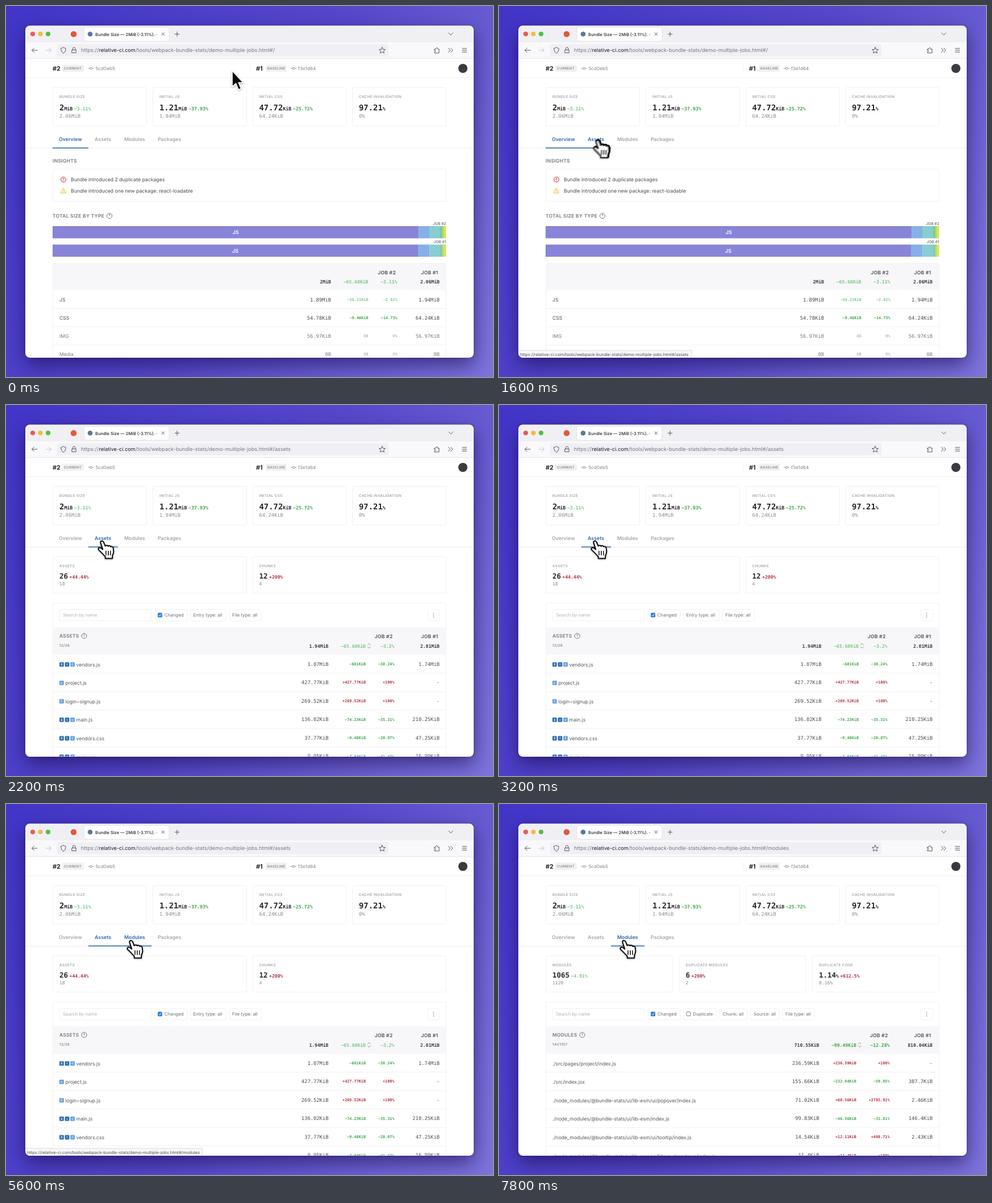
Animation, 857 px wide and 654 px high, one loop 8 s. Source, as an HTML page:

```html
<!DOCTYPE html>
<html lang="en">
<head>
<meta charset="utf-8">
<title>Bundle stats</title>
<style>
  html, body { margin: 0; width: 100%; height: 100%; overflow: hidden; }
  body { position: relative; background: linear-gradient(118deg, #4235c8 0%, #5648cb 50%, #7d74dc 100%); }
  #frame { position: absolute; left: 34px; top: 34.5px; width: 789px; height: 585px; border-radius: 8px;
    background: #fff; box-shadow: 0 13px 34px rgba(22, 8, 70, .6), 0 0 4px rgba(22, 8, 70, .3); }
  svg { position: absolute; left: 0; top: 0; }
  text { font-family: Inter, sans-serif; text-rendering: geometricPrecision; white-space: pre; }
  .mono { font-family: "DejaVu Sans Mono", monospace; }
  .icon { fill: none; stroke: #55555c; stroke-width: 1; stroke-linecap: round; stroke-linejoin: round; }
  .tab text { fill: #a6a6aa; }
  .tab rect { visibility: hidden; }
  .tab.on text, .tab.on rect { fill: #2a68b0; visibility: visible; }
</style>
</head>
<body>
<div id="frame"></div>
<svg id="stage" width="857" height="654" viewBox="0 0 857 654"></svg>
<script>
const BLUE = '#2c6fb5', GREEN = '#3aa845', SOFT = '#78cc82', RED = '#b5303d';
const INK = '#25262b', TEXT = '#4b4b50', MUTED = '#8c8c91', FAINT = '#a3a3a8', LINE = '#f1f1f3';
const BASE_URL = '/tools/webpack-bundle-stats/demo-multiple-jobs.html#/';

// Texts are placed by the vertical centre of their capitals.
const text = (x, cy, s, size, fill, weight = 400, extra = '') =>
  `<text x="${x}" y="${cy + size * .36}" font-size="${size}" fill="${fill}" font-weight="${weight}" ${extra}>${s}</text>`;
const END = 'text-anchor="end"', MID = 'text-anchor="middle"';
const num = (x, cy, s, size, fill, weight = 400) => text(x, cy, s, size, fill, weight, `class="mono" ${END}`);
const caps = (x, cy, s, size, fill, extra = '') => text(x, cy, s, size, fill, 600, `letter-spacing="${size < 8 ? .4 : .25}" ${extra}`);
const rect = (x, y, w, h, fill, extra = '') => `<rect x="${x}" y="${y}" width="${w}" height="${h}" fill="${fill}" ${extra}/>`;
const box = (x, y, w, h, r = 2.5) => rect(x + .5, y + .5, w - 1, h - 1, '#fff', `rx="${r}" stroke="${LINE}"`);
const dot = (x, y, r, fill) => `<circle cx="${x}" cy="${y}" r="${r}" fill="${fill}"/>`;
const icon = (d, extra = '') => `<path class="icon" d="${d}" ${extra}/>`;
const ring = (x, y, r) => `M${x - r} ${y}a${r} ${r} 0 1 0 ${2 * r} 0a${r} ${r} 0 1 0 ${-2 * r} 0`;
const minus = s => s.replace('-', '−');
const help = (x, y) => icon(ring(x, y, 4.6), 'style="stroke:#777"') + text(x, y, '?', 6.8, '#666', 500, MID);

function card(x, y, w, h, label, value, unit, delta, color, prev, big) {
  const base = y + (big ? 41 : 38.7), small = big ? 8.3 : 8.1;
  return box(x, y, w, h) + caps(x + 12, y + 16.3, label, 6.3, FAINT) +
    `<text class="mono" x="${x + 12}" y="${base}" font-size="${big ? 13.9 : 12.5}" font-weight="700" fill="${INK}">${value}` +
    `<tspan font-size="${small}">${unit}</tspan><tspan dx="2.5" font-size="${small}" fill="${color}">${minus(delta)}</tspan></text>` +
    text(x + 12, y + (big ? 51 : 48), prev, big ? 8.8 : 8.1, MUTED, 400, 'class="mono"');
}

function chrome() {
  const light = ['#ec5a53', '#f2bd3f', '#51c043'].map((c, i) => dot(47 + i * 13.5, 49.3, 4.1, c)).join('');
  return rect(34, 34, 789, 30, '#f0f0f4') + rect(34, 64, 789, 28, '#f9f9fb') + rect(34, 92, 789, 1, '#e6e6ea') + light +
    dot(119, 49.5, 5.3, '#e4573d') + rect(137, 37.5, 150, 24.5, '#fff', 'rx="3" stroke="#dcdce2" stroke-width=".8"') +
    dot(148, 49.5, 4.3, '#55789f') + text(157, 49.8, 'Bundle Size — 2MiB (-3.11%). ·', 7.5, '#222', 500) +
    icon('M274 47.2l4.6 4.6m0-4.6l-4.6 4.6M301 45.8v7.6m-3.8-3.8h7.6M779 47.5l3.7 3.7 3.7-3.7') +
    rect(90, 67.5, 583, 21, '#f0f0f4', 'rx="2.5"') +
    icon('M55 78H45.5m4-4l-4 4 4 4M97 74.5q2.5-.3 4-1.8 1.5 1.5 4 1.8v3q-.5 4-4 6-3.5-2-4-6zM116.2 77.5h7v5h-7zM117.5 77.5v-2.3a2.2 2.2 0 0 1 4.4 0v2.3') +
    icon('M70 78h9.5m-4-4l4 4-4 4', 'style="stroke:#c4c4ca"') +
    icon('M662 72.8l1.6 3.5 3.8.4-2.8 2.6.8 3.8-3.4-1.9-3.4 1.9.8-3.8-2.8-2.6 3.8-.4z') +
    icon('M754 76h2.7c-1-3.5 3.8-3.5 2.8 0h2.6v6.8H754v-2.2c3 .6 3-3 0-2.4zM778.5 74.5l3.3 3.5-3.3 3.5m4.4-7l3.3 3.5-3.3 3.5M803 74.8h7.6m-7.6 3.2h7.6m-7.6 3.2h7.6') +
    text(132, 78, 'https://', 9.2, '#77777d') + text(163.5, 78, 'relative-ci.com', 9.15, '#1c1c20') +
    text(228, 78, BASE_URL, 9.2, '#77777d', 400, 'id="url"');
}

function job(x, name, badge, width, hash, hashX) {
  return text(x, 110, name, 10.8, INK, 700) + rect(x + 17, 103.5, width, 12.5, '#f1f1f3', 'rx="2"') +
    text(x + 20, 110, badge, 6, MUTED, 600, 'letter-spacing=".3"') +
    icon(ring(hashX - 8, 110, 1.9) + `M${hashX - 12.5} 110h2.5m4 0h2.5`, 'style="stroke:#999"') + text(hashX, 110, hash, 8.2, '#85858a');
}

function header() {
  const tabs = [['Overview', 82, 63], ['Assets', 145, 52], ['Modules', 197, 59], ['Packages', 256, 63]];
  return job(82, '#2', 'CURRENT', 38, '5cd0eb5', 157.5) + job(440, '#1', 'BASELINE', 37, 'f3e1d64', 514) +
    rect(429, 103, 1, 14, LINE) + dot(804, 110, 8, '#3a3a40') + rect(34, 126, 789, 1, '#f2f2f4') +
    card(82, 143, 166, 69, 'BUNDLE SIZE', '2', 'MiB', '-3.11%', SOFT, '2.06MiB', true) +
    card(258, 143, 166, 69, 'INITIAL JS', '1.21', 'MiB', '-37.93%', GREEN, '1.94MiB', true) +
    card(433.5, 143, 166, 69, 'INITIAL CSS', '47.72', 'KiB', '-25.72%', GREEN, '64.24KiB', true) +
    card(609, 143, 166, 69, 'CACHE INVALIDATION', '97.21', '%', '', GREEN, '0%', true) +
    rect(34, 250, 789, 1, '#eeeef1') +
    tabs.map(([s, x, w]) => `<g class="tab">${rect(x, 249.5, w, 1.6, BLUE)}${text(x + 11, 235.2, s, 8.8, FAINT, 600)}</g>`).join('');
}

// Each row: label, size, delta, percent, previous size, delta colour.
function numbers(cols, y, [, size, delta, pct, prev, color], fill = TEXT) {
  const weight = color === FAINT ? 400 : 700;
  return num(cols[0], y, size, 8.8, fill) + num(cols[1], y, minus(delta), 6.8, color, weight) +
    num(cols[2], y, minus(pct), 6.8, color, weight) + num(cols[3], y, prev, 8.8, fill);
}

function totals(cols, y, jobX, [size, delta, pct, prev], color) {
  return caps(jobX, y, 'JOB #2', 8.6, '#4c4c55', END) + caps(760.5, y, 'JOB #1', 8.6, '#4c4c55', END) +
    num(cols[0], y + 16.5, size, 8.1, '#3a3a40', 700) + num(cols[1], y + 16.5, minus(delta), 8.1, color, 700) +
    num(cols[2], y + 16.5, minus(pct), 8.1, color, 700) + num(763, y + 16.5, prev, 8.1, '#3a3a40', 700);
}

function overview() {
  const cols = [572, 637.5, 688.5, 763];
  const rows = [
    ['JS', '1.89MiB', '-56.21KiB', '-2.82%', '1.94MiB', SOFT],
    ['CSS', '54.78KiB', '-9.46KiB', '-14.73%', '64.24KiB', GREEN],
    ['IMG', '56.97KiB', '0B', '0%', '56.97KiB', FAINT],
    ['Media', '0B', '0B', '0%', '0B', FAINT]];
  const colors = ['#8884d8', '#85b0e8', '#88cdd0', '#7cc79a', '#a4d96c', '#dbe256'];
  const bar = (y, name, edges) => colors.map((c, i) => rect(edges[i], y, edges[i + 1] - edges[i], 21.5, c)).join('') +
    text((82 + edges[1]) / 2, y + 11, 'JS', 9, '#fff', 600, MID) + text(774.5, y - 4.7, name, 6.6, '#77777c', 600, END);
  return caps(82, 273, 'INSIGHTS', 8.6, '#77777c') + box(82, 287, 693, 58) +
    dot(101, 306, 6.5, '#fdeeee') + icon(ring(101, 306, 4.4) + 'M101 303.5v3m0 1.7v.1', 'style="stroke:#d0444e"') +
    dot(101, 326, 6.5, '#fdf8df') + icon('M101 321.8l4.6 7.8h-9.2zM101 324.7v2m0 1.3v.1', 'style="stroke:#e6c95a"') +
    text(114, 306, 'Bundle introduced 2 duplicate packages', 8.7, '#4a4a50') +
    text(114, 326, 'Bundle introduced one new package: react-loadable', 8.7, '#4a4a50') +
    caps(82, 369.7, 'TOTAL SIZE BY TYPE', 8.5, '#77777c') + help(182, 370) +
    bar(388, 'JOB #2', [82, 726.5, 745, 764, 767, 770, 774.5]) + bar(420.5, 'JOB #1', [82, 725, 745.5, 765, 767.5, 770.5, 774.5]) +
    box(82, 453, 693, 200) + rect(82.5, 454, 692, 47, '#f7f7f9') +
    totals(cols, 469.5, 686, ['2MiB', '-65.68KiB', '-3.11%', '2.06MiB'], SOFT) +
    rows.map((row, i) => {
      const y = 517.5 + 32 * i, fill = i < 2 ? TEXT : '#7c7c82';
      return text(94, y + .3, row[0], 8.6, fill) + numbers(cols, y, row, fill) + rect(82, y + 15.5, 693, 1, LINE);
    }).join('');
}

function checkbox(x, checked) {
  return checked ? rect(x, 366.3, 8, 8, '#2f7fd6', 'rx="1.5"') + icon(`M${x + 2} 370.3l1.6 1.8 2.6-3.6`, 'style="stroke:#fff"')
    : rect(x + .5, 366.5, 7, 7, '#fff', 'rx="1.2" stroke="#77777c"');
}

function table(title, count, helpX, filters, cols, jobX, total, color, rows) {
  const badges = (names, y) => [...names].map((c, i) =>
    rect(94 + 9.6 * i, y - 3.8, 7.8, 7.8, c === 'C' ? '#669fda' : BLUE, 'rx="1.3"') +
    text(97.9 + 9.6 * i, y, c, 5, '#fff', 700, MID)).join('');
  return box(82, 348.5, 693, 300) + box(93.5, 360, 163, 21) + text(100, 370.5, 'Search by name', 7.9, '#b4b4b9') +
    filters.map(([x, w, s, check]) => box(x, 360, w, 21) + (check === undefined ? '' : checkbox(x + 5.5, check)) +
      text(x + (check === undefined ? 5.5 : 17.3), 370.5, s, 7.9, '#707076')).join('') +
    box(741.5, 360, 22, 21) + [367.3, 370.5, 373.7].map(y => dot(752.5, y, .8, '#66666c')).join('') +
    rect(82.5, 392, 692, 48, '#f7f7f9') + caps(94, 407, title, 8.4, '#77777c') + help(helpX, 407) +
    text(94, 423.5, count, 6.3, '#77777c', 500, 'letter-spacing=".3"') +
    totals(cols, 408.3, jobX, total, color) +
    icon(`M${cols[1] + 3.5} 423l2.3-2.6 2.3 2.6m-4.6 3.2l2.3 2.6 2.3-2.6`, 'style="stroke:#888;stroke-width:.9"') +
    rows.map((row, i) => {
      const y = 457.2 + 32.55 * i, kinds = row[6] || '';
      return badges(kinds, y) + text(94 + (kinds ? kinds.length * 9.6 + .8 : 0), y + .5, row[0], 8.62, '#55555b') +
        numbers(cols, y - .7, row) + rect(82, y + 15, 693, 1, LINE);
    }).join('');
}

const assets = () =>
  card(82, 267, 342, 65, 'ASSETS', '26', '', '+44.44%', RED, '18') + card(433.5, 267, 341.5, 65, 'CHUNKS', '12', '', '+200%', RED, '4') +
  table('ASSETS', '12/26', 137.5, [[261.5, 58, 'Changed', true], [324, 63.5, 'Entry type: all'], [392.5, 57, 'File type: all']],
    [567.5, 633, 683.5, 763], 680.5, ['1.94MiB', '-65.68KiB', '-3.2%', '2.01MiB'], SOFT, [
    ['vendors.js', '1.07MiB', '-681KiB', '-38.24%', '1.74MiB', GREEN, 'EIC'],
    ['project.js', '427.77KiB', '+427.77KiB', '+100%', '-', RED, 'C'],
    ['login~signup.js', '269.52KiB', '+269.52KiB', '+100%', '-', RED, 'C'],
    ['main.js', '136.02KiB', '-74.23KiB', '-35.31%', '210.25KiB', GREEN, 'EIC'],
    ['vendors.css', '37.77KiB', '-9.48KiB', '-20.07%', '47.25KiB', GREEN, 'EIC'],
    ['main.css', '9.95KiB', '-7.04KiB', '-41.43%', '16.99KiB', GREEN, 'EIC']]);

const LIB = './node_modules/@bundle-stats/ui/lib-esm/';
const modules = () =>
  card(82, 267, 224, 65, 'MODULES', '1065', '', '-4.91%', SOFT, '1120') +
  card(316.5, 267, 224, 65, 'DUPLICATE MODULES', '6', '', '+200%', RED, '2') +
  card(551, 267, 224, 65, 'DUPLICATE CODE', '1.14', '%', '+612.5%', RED, '0.16%') +
  table('MODULES', '141/1157', 146.5, [[261.5, 58, 'Changed', true], [324, 59.5, 'Duplicate', false], [388, 49.5, 'Chunk: all'],
    [442.5, 51, 'Source: all'], [498.5, 57, 'File type: all']],
    [563.5, 628.8, 687.5, 763], 684.5, ['710.55KiB', '-99.49KiB', '-12.28%', '810.04KiB'], GREEN, [
    ['./src/pages/project/index.js', '236.59KiB', '+236.59KiB', '+100%', '-', RED],
    ['./src/index.jsx', '155.66KiB', '-232.04KiB', '-59.85%', '387.7KiB', GREEN],
    [LIB + 'ui/popover/index.js', '71.02KiB', '+68.56KiB', '+2785.91%', '2.46KiB', RED],
    [LIB + 'index.js', '99.83KiB', '-46.56KiB', '-31.81%', '146.4KiB', GREEN],
    [LIB + 'ui/tooltip/index.js', '14.54KiB', '+12.11KiB', '+498.71%', '2.43KiB', RED],
    [LIB + 'ui/filters-dropdown/index.js', '11.4KiB', '+11.4KiB', '+100%', '-', RED]]);

const BLUR_COPIES = 9;
const ARROW = '<path d="M0 0V28.5L6.5 22.6L11 33.5L15.6 31.5L11.2 21H19.3Z" fill="#050505" stroke="#fff" stroke-width="1.7" stroke-linejoin="round"/>';
const HAND = `<g fill="#fff" stroke="#0a0a0a" stroke-width="2" stroke-linejoin="round" stroke-linecap="round">
  <path d="M-3.6 2.6C-3.8-.9 .6-1.1 1.8 1.8L4.6 8.6C6 7 8.8 7.2 9.8 9C11 7.4 13.7 8 14.4 10C16 8.9 18.5 10 18.8 12.6L19.3 18C19.5 22 17.5 23.8 17.2 26.5V30.5H4.8V27.5C2.4 24.6-1.6 20.6-6.9 15.4C-8.8 12.3-5.6 10.3-2.9 12.3L.3 14.6Z"/>
  <path d="M6 17.5v7M10 17.5v7M14 17.5v7" fill="none" stroke-width="1.5"/></g>`;

const stage = document.getElementById('stage');
stage.innerHTML = `<clipPath id="window"><rect x="34" y="34.5" width="789" height="585" rx="8"/></clipPath>
  <g clip-path="url(#window)">${chrome()}${header()}
    ${[overview, assets, modules].map(page => `<g class="page">${page()}</g>`).join('')}
    <g id="status"><rect x="33" y="607" height="14" fill="#f7f7f9" stroke="#dedee3"/>${text(37, 614, '', 7.4, '#55555b')}</g>
  </g>
  <g style="filter:drop-shadow(0 1.5px 1.5px rgba(0,0,0,.35))">${Array.from({ length: BLUR_COPIES }, (_, i) =>
    `<g class="cursor" opacity="${1 / (i + 1)}"><g>${ARROW}</g><g>${HAND}</g></g>`).join('')}</g>`;

const all = selector => [...stage.querySelectorAll(selector)];
const pages = all('.page'), tabs = all('.tab'), cursors = all('.cursor');
const [url, status] = all('#url, #status');

const ease = (t, from, to) => {
  const u = Math.min(1, Math.max(0, (t - from) / (to - from)));
  return u * u * (3 - 2 * u);
};
const within = (t, from, to) => t >= from && t < to;
const show = (node, visible) => node.setAttribute('display', visible ? 'inline' : 'none');

function pointer(t) {
  const first = ease(t, 480, 1700), second = ease(t, 4200, 4900);
  return [398 - 228 * first + 51 * second, 114 + 126 * first ** 1.3 + second];
}

function render(t) {
  const page = t < 2200 ? 0 : t < 6400 ? 1 : 2;
  const hover = t < 1400 ? 0 : t < 4600 ? 1 : 2;
  const route = t < 2000 ? '' : t < 6200 ? 'assets' : 'modules';
  pages.forEach((node, i) => show(node, i === page));
  tabs.forEach((node, i) => node.classList.toggle('on', i === page || i === hover));
  url.textContent = BASE_URL + route;

  const target = ['', 'assets', 'modules'][hover];
  show(status, within(t, 1600, 2200) || within(t, 4800, 6400));
  status.setAttribute('opacity', within(t, 2000, 2200) || within(t, 6200, 6400) ? .65 : 1);
  status.firstElementChild.setAttribute('width', hover === 1 ? 306 : 313);
  status.lastElementChild.textContent = 'https://relative-ci.com' + BASE_URL + target;

  const pressed = within(t, 1800, 2200) || within(t, 6000, 6400);
  const moving = within(t, 480, 1700) || within(t, 4200, 4900);
  cursors.forEach((node, i) => {
    const [x, y] = pointer(t + (moving ? 32 * (i / (BLUR_COPIES - 1) - .5) : 0));
    show(node, moving || i === 0);
    show(node.children[0], hover === 0);
    show(node.children[1], hover > 0);
    node.setAttribute('transform', `translate(${x} ${y}) scale(${pressed ? .9 : 1})`);
  });
}

const STEP = 200, LOOP = 8000;
const start = performance.now();
function tick() {
  const t = (performance.now() - start) % LOOP;
  render(Math.floor(t / STEP) * STEP);
  requestAnimationFrame(tick);
}
tick();
</script>
</body>
</html>
```
